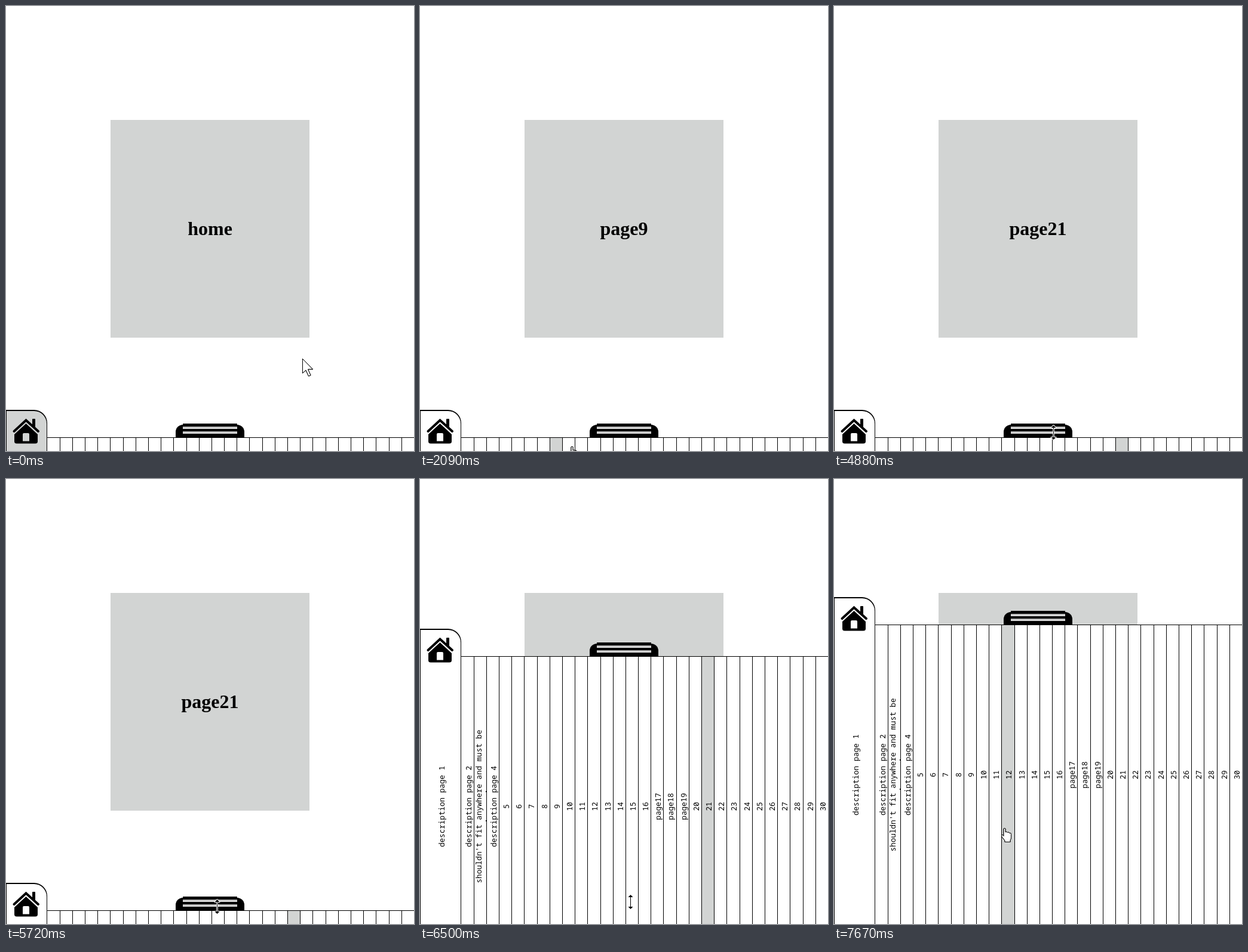
Animation, 683 px wide and 746 px high, one loop 8 s. Source, as an HTML page with a canvas:

```html
<!DOCTYPE html>
<html lang="en">
<head>
<meta charset="utf-8">
<title>Page drawer</title>
<style>
  html, body { margin: 0; height: 100%; overflow: hidden; background: #fff; }
  canvas { display: block; }
</style>
</head>
<body>
<canvas width="683" height="746"></canvas>
<script>
const ctx = document.querySelector('canvas').getContext('2d');
const W = 683, H = 746, LOOP = 8000, TICK = 77.4;
const GRAY = '#d2d4d3';
const CLOSED_Y = 723, OPEN_Y = 244, OPEN_START = 80, OPEN_TICKS = 6.59, OPEN_END = 86;

// Selected page from each tick on.
const selections = [[0, 1], [23, 9], [36, 15], [50, 21], [99, 12]];

// Mouse path: tick, hot spot x, y, cursor shape.
const mouse = [
  [0, 496, 591, 'arrow'], [7, 496, 591, 'arrow'], [10, 326, 662, 'arrow'], [11, 326, 662, 'arrow'],
  [18, 248, 722, 'arrow'], [19, 236, 730, 'hand'], [20, 227, 734, 'hand'], [26, 227, 734, 'hand'],
  [27, 254, 738, 'hand'], [32, 363, 738, 'hand'], [39, 363, 738, 'hand'], [46, 471, 738, 'hand'],
  [53, 471, 738, 'hand'], [60, 395, 730, 'hand'], [61, 380, 720, 'resize'], [63, 367, 715, 'resize'],
  [64, 365, 712, 'resize'], [65, 366, 690, 'arrow'], [67, 370, 601, 'arrow'], [68, 370, 601, 'arrow'],
  [72, 362, 680, 'arrow'], [73, 356, 712, 'resize'], [74, 353, 717, 'resize'], [76, 352, 709, 'resize'],
  [87, 352, 709, 'resize'], [88, 352, 708, 'hand'], [91, 304, 593, 'hand'], [93, 304, 593, 'hand'],
  [96, 285, 585, 'hand'], [999, 285, 585, 'hand']
];

const cursors = {
  arrow: new Path2D('M.5 .5V24.5L6 19.5L10.5 29.5L14 28L9.5 18H17.5Z'),
  hand: new Path2D('M-1 2Q-1 .5 .5 .5Q2 .5 2 2V7Q4 5.5 5.5 7.5Q7.5 6 8.5 8.5Q11.5 7.5 11.5 10.5V16' +
    'Q11.5 19 10 20.5V23.5H1V21L-3.5 15.5Q-5.5 12.5 -4 11.5Q-2.5 11 -1 13.5Z'),
  resize: new Path2D('M.5 -12L4.5 -8H1V8H4.5L.5 12L-3.5 8H0V-8H-3.5Z')
};
const houseBody = new Path2D('M33.5 -23L53 -5V7Q53 10.5 49 10.5H18Q14 10.5 14 7V-5Z' +
  'M30 -7Q28 -7 28 -5V6.5H39V-5Q39 -7 37 -7Z');
const houseRoof = new Path2D('M13.5 -10L33.5 -28.5L54 -10');

const edge = page => Math.floor(69.02 + (page - 2) * 21.185);

function rect(color, x, y, w, h, radii = 0) {
  ctx.fillStyle = color;
  ctx.beginPath();
  ctx.roundRect(x, y, w, h, radii);
  ctx.fill();
}

// CSS "ease": cubic-bezier(.25, .1, .25, 1)
function ease(x) {
  if (x <= 0 || x >= 1) return x <= 0 ? 0 : 1;
  const bezier = (a, b, s) => 3 * (1 - s) ** 2 * s * a + 3 * (1 - s) * s * s * b + s ** 3;
  let low = 0, high = 1;
  for (let i = 0; i < 24; i++) {
    const mid = (low + high) / 2;
    if (bezier(.25, .25, mid) < x) low = mid; else high = mid;
  }
  return bezier(.1, 1, low);
}

function label(page) {
  if (page === 3) return "shouldn't fit anywhere and must be";
  if (page <= 4) return 'description page ' + page;
  return page >= 17 && page <= 19 ? 'page' + page : String(page);
}

function drawContent(page) {
  rect(GRAY, 175, 191, 333, 365);
  ctx.fillStyle = '#000';
  ctx.font = 'bold 32px "Liberation Serif", serif';
  ctx.fillText(page === 1 ? 'home' : 'page' + page, 341.5, 384);
}

function drawHandle(top) {
  rect('#000', 284, top - 21, 115, 21, [12, 12, 0, 0]);
  rect('#000', 296, top - 23, 91, 23);
  for (const y of [top - 18, top - 10]) {
    const shine = ctx.createLinearGradient(0, y, 0, y + 4);
    shine.addColorStop(0, '#aaa');
    shine.addColorStop(1, '#eee');
    rect(shine, 296, y, 91, 4);
  }
}

function drawHouse(top) {
  ctx.save();
  ctx.translate(0, top);
  rect('#000', 44, -31, 5, 15, 1);
  ctx.fill(houseBody, 'evenodd');
  ctx.strokeStyle = '#000';
  ctx.lineWidth = 4;
  ctx.lineCap = 'round';
  ctx.stroke(houseRoof);
  ctx.restore();
}

function drawDrawer(top, selected) {
  drawHandle(top);
  rect('#fff', 0, top, W, H - top);
  rect('#000', 68, top, W - 68, 1);
  rect('#000', 0, top - 46, 69, H, [0, 22, 0, 0]);
  rect(selected === 1 ? GRAY : '#fff', 1, top - 44, 67, H, [0, 21, 0, 0]);
  drawHouse(top);

  ctx.font = '12.6px "Noto Sans Mono", monospace';
  for (let page = 1; page <= 30; page++) {
    const left = edge(page), right = edge(page + 1);
    if (page > 1) {
      if (page === selected) rect(GRAY, left + 1, top + 1, right - left - 1, H);
      if (page < 30) rect('#000', right, top, 1, H);
    }
    ctx.save();
    ctx.translate(page === 1 ? 41 : page === 3 ? 103 : left + 17, top + 252);
    ctx.rotate(-Math.PI / 2);
    ctx.fillStyle = '#000';
    ctx.fillText(label(page), 0, 0);
    ctx.restore();
  }
  // Tips of the overflowing second line on page 3
  for (const y of [226, 275]) rect('#000', 110, top + y, 1, 2);
}

function drawCursor(tick) {
  const next = mouse.findIndex(key => key[0] > tick);
  const [t0, x0, y0, shape] = mouse[next - 1], [t1, x1, y1] = mouse[next];
  const part = (tick - t0) / (t1 - t0);
  ctx.save();
  ctx.translate(Math.round(x0 + (x1 - x0) * part), Math.round(y0 + (y1 - y0) * part));
  const resize = shape === 'resize';
  ctx.lineWidth = resize ? 2 : 1;
  ctx.lineJoin = 'round';
  ctx.strokeStyle = resize ? '#fff' : '#000';
  ctx.fillStyle = resize ? '#000' : '#fff';
  ctx.stroke(cursors[shape]);
  ctx.fill(cursors[shape]);
  if (!resize) ctx.stroke(cursors[shape]);
  ctx.restore();
}

function draw(time) {
  // The screen updates in discrete ticks.
  const tick = Math.floor((time % LOOP + 14) / TICK);
  const page = selections.findLast(([start]) => start <= tick)[1];
  const opened = tick >= OPEN_END ? 1 : ease((tick - OPEN_START) / OPEN_TICKS);
  rect('#fff', 0, 0, W, H);
  ctx.textAlign = 'center';
  drawContent(page);
  drawDrawer(Math.round(CLOSED_Y + (OPEN_Y - CLOSED_Y) * opened), page);
  drawCursor(tick);
}

const start = performance.now();
function loop() {
  draw(performance.now() - start);
  requestAnimationFrame(loop);
}
loop();
</script>
</body>
</html>
```
